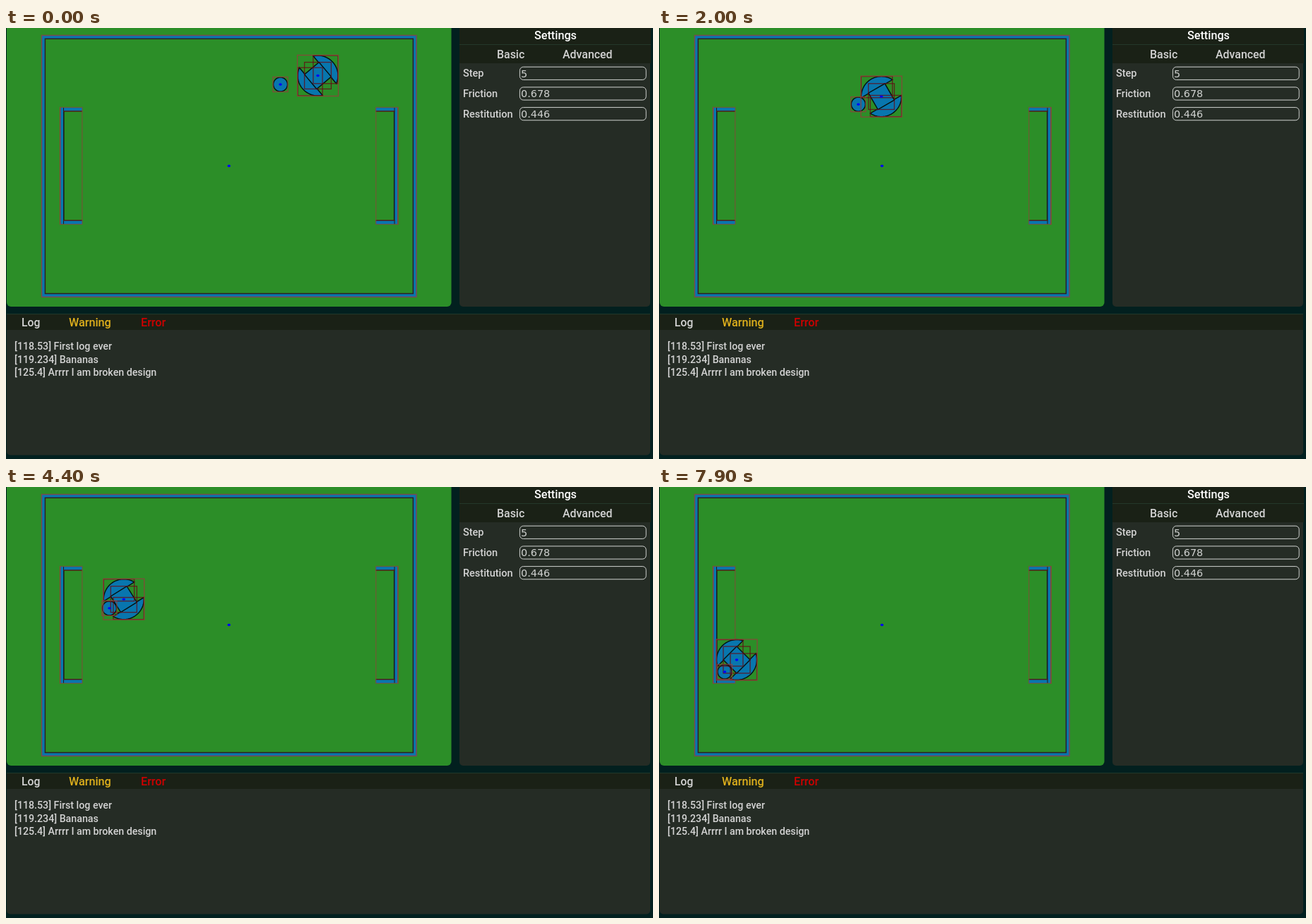
Recreate the animation shown at these times as an HTML page with a canvas. Size 916 by 611 pixels, loop 8 s.

```html
<!DOCTYPE html>
<html lang="en">
<head>
<meta charset="utf-8">
<title>Robot field</title>
<style>
html, body { margin: 0; width: 100%; height: 100%; overflow: hidden; background: #02201f; }
canvas { display: block; }
</style>
</head>
<body>
<canvas id="stage" width="916" height="611"></canvas>
<script>
const ctx = document.getElementById('stage').getContext('2d');
const LOOP = 8000, STEP = 100;
const GREEN = '#2c8e28', BLUE = '#0876ae', EDGE = '#04100f';
const BODY_BOX = 'rgba(150,60,60,0.8)', PART_BOX = 'rgba(100,10,20,0.8)';
const DARK = '#1a2116', PANEL = '#252c25', TEXT = '#d3d3d3';
const UI = 'Roboto, sans-serif';

// moments: ball caught, side wall reached, goal floor reached
const CAUGHT = 2700, WALL = 5330, FLOOR = 6400, END = 7900;
const ROBOT_R = 28.5, BALL_R = 10;

const lerp = (a, b, k) => a + (b - a) * k;
const phase = (t, from, to) => Math.max(0, Math.min(1, (t - from) / (to - from)));

function robotAt(t) {
  const caught = phase(t, CAUGHT, FLOOR);
  const settle = 1 - (1 - phase(t, FLOOR, END)) ** 3;
  const x = t < CAUGHT
    ? lerp(441.5, 270.5, phase(t, 0, CAUGHT))
    : lerp(270.5, 110, phase(t, CAUGHT, WALL));
  const y = lerp(67.5, 107.5, phase(t, 0, CAUGHT)) + 121.5 * caught ** 1.1 + 16 * settle;
  const deg = Math.max(-30, 50 - 0.0408 * t)
    - 3 * phase(t, CAUGHT, WALL)
    - 34 * phase(t, WALL, FLOOR)
    + 22 * phase(t, FLOOR + 300, END);
  return { x, y, turn: deg * Math.PI / 180 };
}

// The ball rolls freely, then stays in the robot's mouth within the goal walls.
function ballAt(t, robot) {
  if (t < CAUGHT) {
    const k = t / CAUGHT;
    return { x: lerp(388.5, 245, k), y: lerp(80, 122, k ** 1.33) };
  }
  const reach = lerp(29.5, 24, phase(t, CAUGHT, CAUGHT + 1100));
  return {
    x: Math.max(92, robot.x - reach * Math.cos(robot.turn)),
    y: Math.min(262.5, robot.y - reach * Math.sin(robot.turn))
  };
}

function rect(x, y, w, h, color) {
  ctx.fillStyle = color;
  ctx.fillRect(x, y, w, h);
}

function rounded(x, y, w, h, radii, color) {
  ctx.beginPath();
  ctx.roundRect(x, y, w, h, radii);
  ctx.fillStyle = color;
  ctx.fill();
}

function frame(x0, y0, x1, y1, color, width = 1.3) {
  ctx.strokeStyle = color;
  ctx.lineWidth = width;
  ctx.strokeRect(x0, y0, x1 - x0, y1 - y0);
}

function label(text, x, y, size, color = TEXT, family = UI, weight = 500) {
  ctx.font = `${weight} ${size}px ${family}`;
  ctx.fillStyle = color;
  ctx.fillText(text, x, y);
}

function dot(x, y) {
  ctx.beginPath();
  ctx.ellipse(x, y, 2.2, 1.7, 0, 0, Math.PI * 2);
  ctx.fillStyle = '#0000ff';
  ctx.fill();
}

function drawGoal() {
  rect(77, 113, 5, 165, BLUE);
  rect(81, 113, 1.6, 165, '#1c1a20');
  for (const [bar, inner] of [[113, 117.3], [273, 272]]) {
    rect(82, bar, 26, 5, BLUE);
    rect(81, inner, 27, 1.4, '#54180f');
  }
  frame(76.5, 112.5, 107.8, 278.3, 'rgba(150,60,60,0.6)');
  rect(76, 112, 1.4, 167, BODY_BOX);
}

function drawField() {
  rounded(1, -10, 629.5, 405, [0, 0, 6, 6], GREEN);
  frame(53, 13, 578.7, 379, BLUE, 6);
  frame(55.4, 15.3, 576.4, 376.5, '#2e1f22', 1.5);
  frame(50.5, 10.5, 581, 381.3, BODY_BOX, 1.5);
  drawGoal();
  ctx.save();
  ctx.translate(631.5, 0);
  ctx.scale(-1, 1);
  drawGoal();
  ctx.restore();
  dot(315.7, 195.5);
}

function drawSettings() {
  rounded(642, -10, 270, 405, [0, 0, 5, 5], PANEL);
  rect(642, 0, 271, 50, DARK);
  rect(642, 23, 271, 1, '#24382a');
  label('Settings', 748, 16, 16.2, '#ffffff');
  label('Basic', 695, 43, 15.9);
  label('Advanced', 788, 43, 15.9);
  [['Step', '5'], ['Friction', '0.678'], ['Restitution', '0.446']].forEach(([name, value], i) => {
    const y = 64.2 + i * 28.7;
    label(name, 647, y + 5, 14.5);
    ctx.beginPath();
    ctx.roundRect(727.4, y - 9, 178.8, 18.2, 5);
    ctx.strokeStyle = '#d0d3d0';
    ctx.lineWidth = 1;
    ctx.stroke();
    label(value, 729, y + 5.3, 14.4, '#cfd1cf', '"DejaVu Sans", sans-serif', 400);
  });
}

function drawLog() {
  rounded(1, 405, 911, 200.5, 5, PANEL);
  rect(1, 405, 911, 23, DARK);
  rect(1, 405, 911, 1, '#20382a');
  label('Log', 22, 422.5, 15.7);
  label('Warning', 89, 422.5, 16.2, '#dfb01c');
  label('Error', 191, 422.5, 16.2, '#cc0000');
  ['[118.53] First log ever', '[119.234] Bananas', '[125.4] Arrrr I am broken design']
    .forEach((line, i) => label(line, 12, Math.round(456 + i * 18.6), 14.2));
}

function shape(points) {
  ctx.beginPath();
  points.forEach(([x, y]) => ctx.lineTo(x, y));
  ctx.closePath();
  ctx.fillStyle = BLUE;
  ctx.fill();
  ctx.strokeStyle = EDGE;
  ctx.lineWidth = 1.4;
  ctx.stroke();
}

function boundingBox(points, color, pad = 0) {
  const xs = points.map(p => p[0]), ys = points.map(p => p[1]);
  frame(Math.min(...xs) - pad, Math.min(...ys) - pad, Math.max(...xs) + pad, Math.max(...ys) + pad, color);
}

function arc(x, y, r, from, to, steps = 40) {
  return Array.from({ length: steps + 1 }, (_, i) => {
    const a = lerp(from, to, i / steps);
    return [x + r * Math.cos(a), y + r * Math.sin(a)];
  });
}

function drawBodies(t) {
  const robot = robotAt(t), { x, y, turn } = robot;
  const ball = ballAt(t, robot);
  const spread = Math.acos(12.8 / ROBOT_R);
  const caps = [-1, 1].map(side => {
    const mid = turn + side * Math.PI / 2;
    return arc(x, y, ROBOT_R, mid - spread, mid + spread);
  });
  const core = arc(x, y, 19, turn + Math.PI / 4, turn + Math.PI * 9 / 4, 4);
  const disc = arc(ball.x, ball.y, BALL_R, 0, Math.PI * 2);

  [disc, ...caps, core].forEach(shape);
  [...caps, core].forEach(part => boundingBox(part, PART_BOX));
  boundingBox(caps.flat(), BODY_BOX, 0.5);
  boundingBox(disc, BODY_BOX, 0.5);
  dot(x, y);
  dot(ball.x, ball.y);
}

function draw(now) {
  const t = Math.floor((now % LOOP) / STEP) * STEP;
  rect(0, 0, 916, 611, '#02201f');
  drawField();
  drawBodies(t);
  drawSettings();
  drawLog();
}

const start = performance.now();
function tick() {
  draw(performance.now() - start);
  requestAnimationFrame(tick);
}
tick();
</script>
</body>
</html>
```
